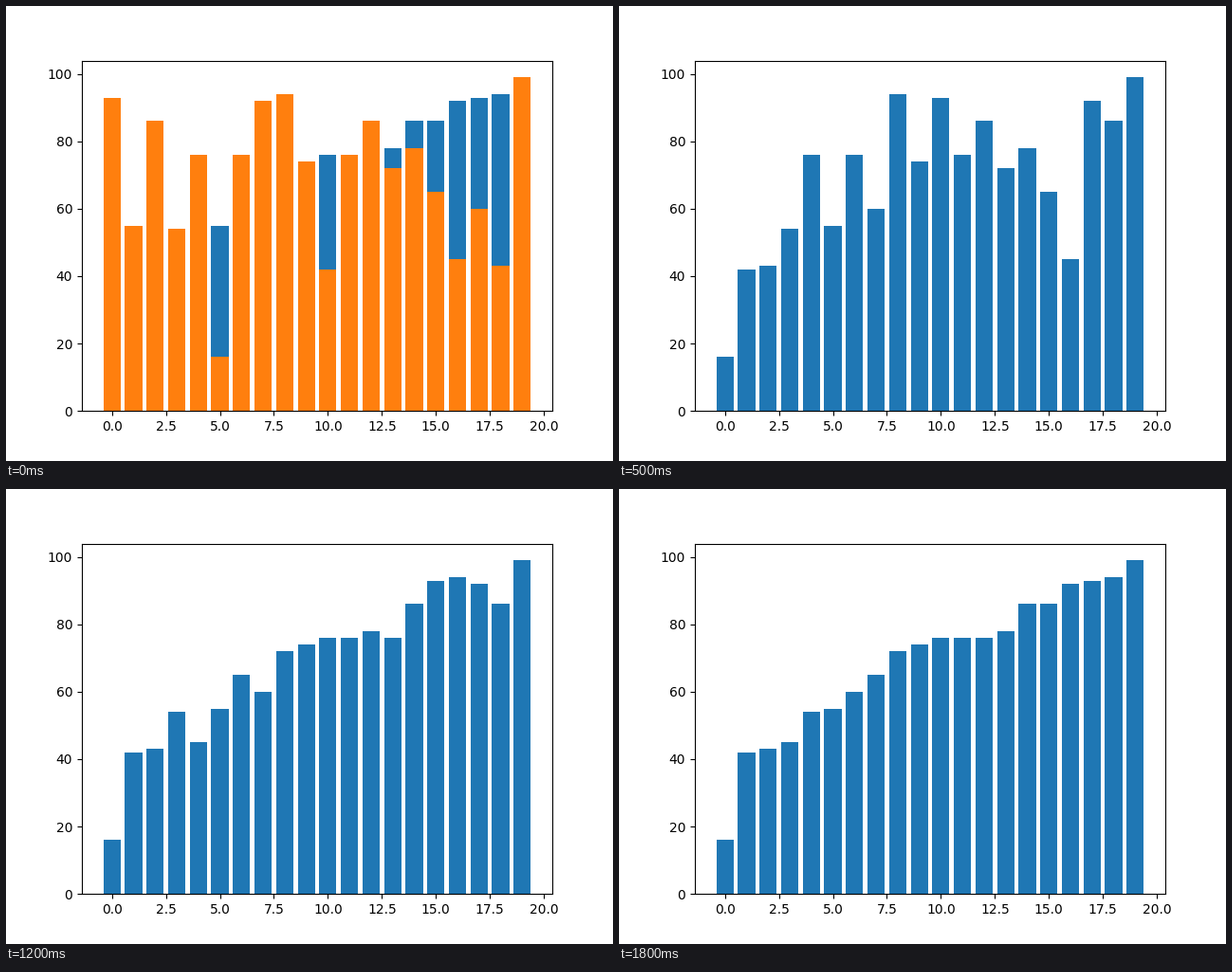
A matplotlib script that plays this animation: 640 by 480 pixels, repeating every 1.9 s.

```python
import matplotlib.pyplot as plt
from matplotlib.animation import FuncAnimation

VALUES = [93, 55, 86, 54, 76, 16, 76, 92, 94, 74,
          42, 76, 86, 72, 78, 65, 45, 60, 43, 99]


def swap(a, i, j):
    """Swap two items, yielding a snapshot only if the list changes."""
    if a[i] != a[j]:
        a[i], a[j] = a[j], a[i]
        yield a[:]


def quicksort(a, lo, hi):
    """Sort in place with the last item as pivot, yielding each state."""
    if lo >= hi:
        return
    pivot = a[hi]
    i, j = lo, hi - 1
    while True:
        while i < hi and a[i] < pivot:
            i += 1
        while j >= lo and a[j] >= pivot:
            j -= 1
        if i >= j:
            break
        yield from swap(a, i, j)
    yield from swap(a, i, hi)
    yield from quicksort(a, lo, i - 1)
    yield from quicksort(a, i + 1, hi)


states = [VALUES] + list(quicksort(VALUES[:], 0, len(VALUES) - 1))

fig, ax = plt.subplots(figsize=(6.4, 4.8), dpi=100)
xs = range(len(VALUES))
blue = ax.bar(xs, states[-1], color="C0")
orange = ax.bar(xs, VALUES, color="C1")


def update(n):
    # The opening state lies in orange over the sorted result.
    heights = states[n] if n else states[-1]
    for bar, height in zip(blue, heights):
        bar.set_height(height)
    for bar in orange:
        bar.set_visible(n == 0)
    return [*blue, *orange]


anim = FuncAnimation(fig, update, frames=len(states), interval=100,
                     repeat=True, repeat_delay=0)
plt.show()
```
